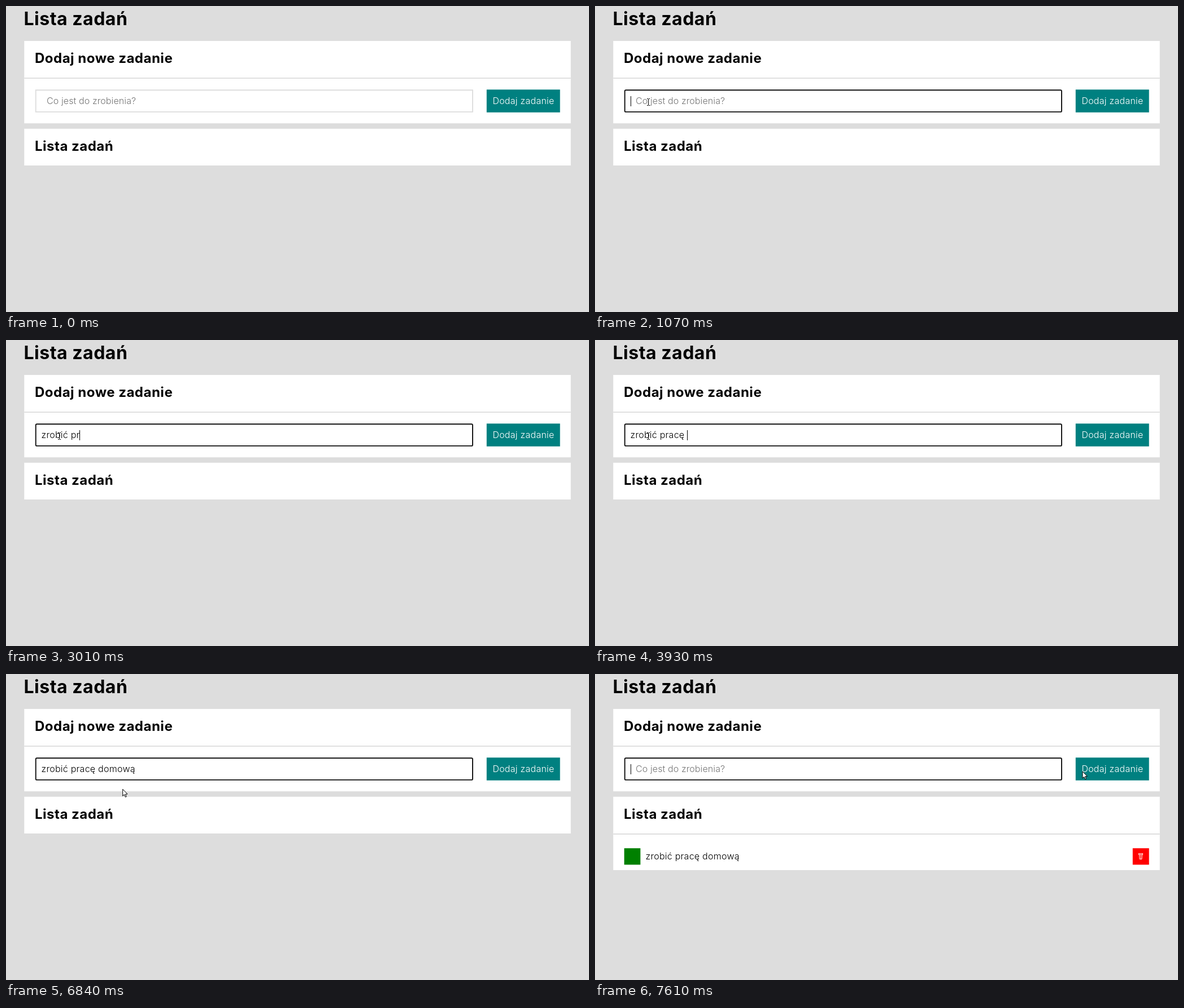
These frames come from a looping animation (1032x543 px, 8 s). An HTML page with a canvas:

```html
<!DOCTYPE html>
<html lang="pl">
<head>
<meta charset="utf-8">
<title>Lista zadań</title>
<style>
html, body { margin: 0; width: 100%; height: 100%; overflow: hidden; background: #ddd; }
body { position: relative; font: 350 16px/20px Inter, "Open Sans", sans-serif; font-optical-sizing: none; letter-spacing: 0.25px; color: #000; }
.text, canvas { position: absolute; left: 0; top: 0; }
.text { white-space: pre; }
h1, h2 { margin: 0; font-weight: 700; letter-spacing: 0.5px; }
h1 { font-size: 32px; line-height: 40px; }
h2 { font-size: 24px; line-height: 30px; }
</style>
</head>
<body>
<canvas id="base" width="1032" height="543"></canvas>
<h1 class="text" style="left:31.5px;top:3px">Lista zadań</h1>
<h2 class="text" style="left:51px;top:78px">Dodaj nowe zadanie</h2>
<span class="text" id="hint" style="left:72px;top:158px;color:#757575;letter-spacing:0.1px">Co jest do zrobienia?</span>
<span class="text" id="typed" style="left:62.5px;top:158px"></span>
<span class="text" style="left:851px;top:158px;width:130px;text-align:center;color:#fff">Dodaj zadanie</span>
<h2 class="text" style="left:51px;top:234px">Lista zadań</h2>
<span class="text" id="item" style="left:89.5px;top:313px">zrobić pracę domową</span>
<canvas id="top" width="1032" height="543"></canvas>
<script>
const LOOP = 8000, STEP = 77;
const CLICK = 920, FOCUS_END = 7530, ADDED = 7610;
const LEFT = 32.3, RIGHT = 999.7, PAD = 19.4;
const TASK = "zrobić pracę domową";
const KEY_TIMES = [1530, 1760, 1930, 2080, 2230, 2560, 2630, 2870, 3010, 3260,
  3510, 3780, 3930, 4080, 4170, 4390, 4550, 5750, 5980];
const CARET_OFF = [[0, 1000], [1470, 1530], [5120, 5660], [6530, 7068], [FOCUS_END, ADDED]];

const el = id => document.getElementById(id);
const [hint, typed, item] = ["hint", "typed", "item"].map(el);
const base = el("base").getContext("2d");
const ctx = el("top").getContext("2d");
const within = (t, a, b) => t >= a && t < b;
const mix = (a, b, u) => a + (b - a) * u;
const ease = u => (1 - Math.cos(Math.PI * u)) / 2;

function box(x1, y1, x2, y2, color) {
  base.fillStyle = color;
  base.fillRect(x1, y1, x2 - x1, y2 - y1);
}

function drawPage(focused, added) {
  box(0, 0, 1032, 543, "#ddd");
  box(LEFT, 62, RIGHT, 208.2, "#fff");
  box(LEFT, 127.2, RIGHT, 129, "#ddd");
  box(LEFT, 217.8, RIGHT, added ? 348 : 283, "#fff");
  box(850.8, 148.3, RIGHT - PAD + 0.4, 188.8, "#008080");

  base.strokeStyle = focused ? "#101010" : "#ddd";
  base.lineWidth = 1.9;
  base.beginPath();
  base.roundRect(52.7, 149.2, 773.3, 38.7, focused ? 2 : 0);
  base.stroke();

  if (!added) return;
  box(LEFT, 283, RIGHT, 284.9, "#ddd");
  box(LEFT + PAD, 309.2, LEFT + PAD + 28.7, 338.4, "#008000");
  box(951.8, 309.2, RIGHT - PAD + 0.4, 338.4, "#f00");
}

function pointerAt(t) {
  if (t < 70) return null;
  if (t < 6760) {
    const k = Math.min(10, Math.floor((t - 70) / STEP));
    if (k < 4) {
      const u = ease(k / 4);
      return [mix(2, 684, u), mix(335, 200, u)];
    }
    const u = ease((k - 4) / 6);
    return [mix(684, 94, u), 200 - 30 * u - 120 * u * (1 - u)];
  }
  const k = Math.min(8, Math.floor((t - 6760) / STEP) + 1);
  const u = ease(k / 8);
  return [mix(94, 863, u), 170 + 3 * u + 272 * u * (1 - u)];
}

function polyline(points, dx = 0, dy = 0) {
  ctx.beginPath();
  for (const [x, y] of points) ctx.lineTo(x + dx, y + dy);
}

function drawArrow(x, y) {
  polyline([[0, 0], [0, 12], [2.8, 9.4], [4.8, 14], [6.6, 13.2], [4.7, 8.8], [8.4, 8.6]], x, y);
  ctx.closePath();
  ctx.fillStyle = "#fff";
  ctx.fill();
  ctx.strokeStyle = "#000";
  ctx.lineWidth = 1;
  ctx.stroke();
}

function drawBeam(x, y) {
  x = Math.round(x);
  y = Math.round(y);
  ctx.fillStyle = "#000";
  ctx.fillRect(x, y - 5, 1, 11);
  for (const edge of [y - 6, y + 6]) {
    ctx.fillRect(x - 2, edge, 2, 1);
    ctx.fillRect(x + 1, edge, 2, 1);
  }
}

function drawBin() {
  ctx.strokeStyle = "#ffe9e0";
  ctx.lineWidth = 1;
  ctx.strokeRect(962.5, 318.5, 7, 2);
  polyline([[963.5, 320.5], [964, 328.5], [968, 328.5], [968.5, 320.5]]);
  ctx.stroke();
  polyline([[966, 321], [966, 328]]);
  ctx.stroke();
}

function drawSquiggle(from, to) {
  const points = [];
  for (let x = from, i = 0; x <= to; x += 2, i++) points.push([x, i % 2 ? 175.2 : 177.2]);
  polyline(points);
  ctx.strokeStyle = "#f00";
  ctx.lineWidth = 1;
  ctx.stroke();
}

function textEnd(text) {
  typed.textContent = text;
  return text ? typed.getBoundingClientRect().right : 63;
}

function draw(t) {
  const added = t >= ADDED;
  const text = added ? "" : TASK.slice(0, KEY_TIMES.filter(k => k <= t).length);
  drawPage(within(t, CLICK, FOCUS_END) || added, added);
  hint.hidden = text !== "";
  item.hidden = !added;

  ctx.clearRect(0, 0, 1032, 543);
  if (added) drawBin();

  const wordStart = within(t, 5580, 5750) ? textEnd("zrobić pracę ") : 0;
  const end = textEnd(text);
  if (wordStart) drawSquiggle(wordStart, end);

  if (!CARET_OFF.some(([a, b]) => within(t, a, b))) {
    ctx.fillStyle = "#000";
    ctx.fillRect(Math.floor(end), 160, 1, 18);
  }

  const pointer = pointerAt(t);
  if (!pointer) return;
  const [x, y] = pointer;
  const overField = within(x, 52, 827) && within(y, 148, 189);
  (overField ? drawBeam : drawArrow)(x, y);
  if (within(t, CLICK, 1070) || within(t, FOCUS_END, ADDED)) {
    ctx.beginPath();
    ctx.arc(x - 0.5, y - 1.2, 11.6, 0, 2 * Math.PI);
    ctx.fillStyle = "rgba(255, 255, 0, 0.5)";
    ctx.fill();
  }
}

const start = performance.now();
function tick() {
  draw((performance.now() - start) % LOOP);
  requestAnimationFrame(tick);
}
tick();
</script>
</body>
</html>
```
